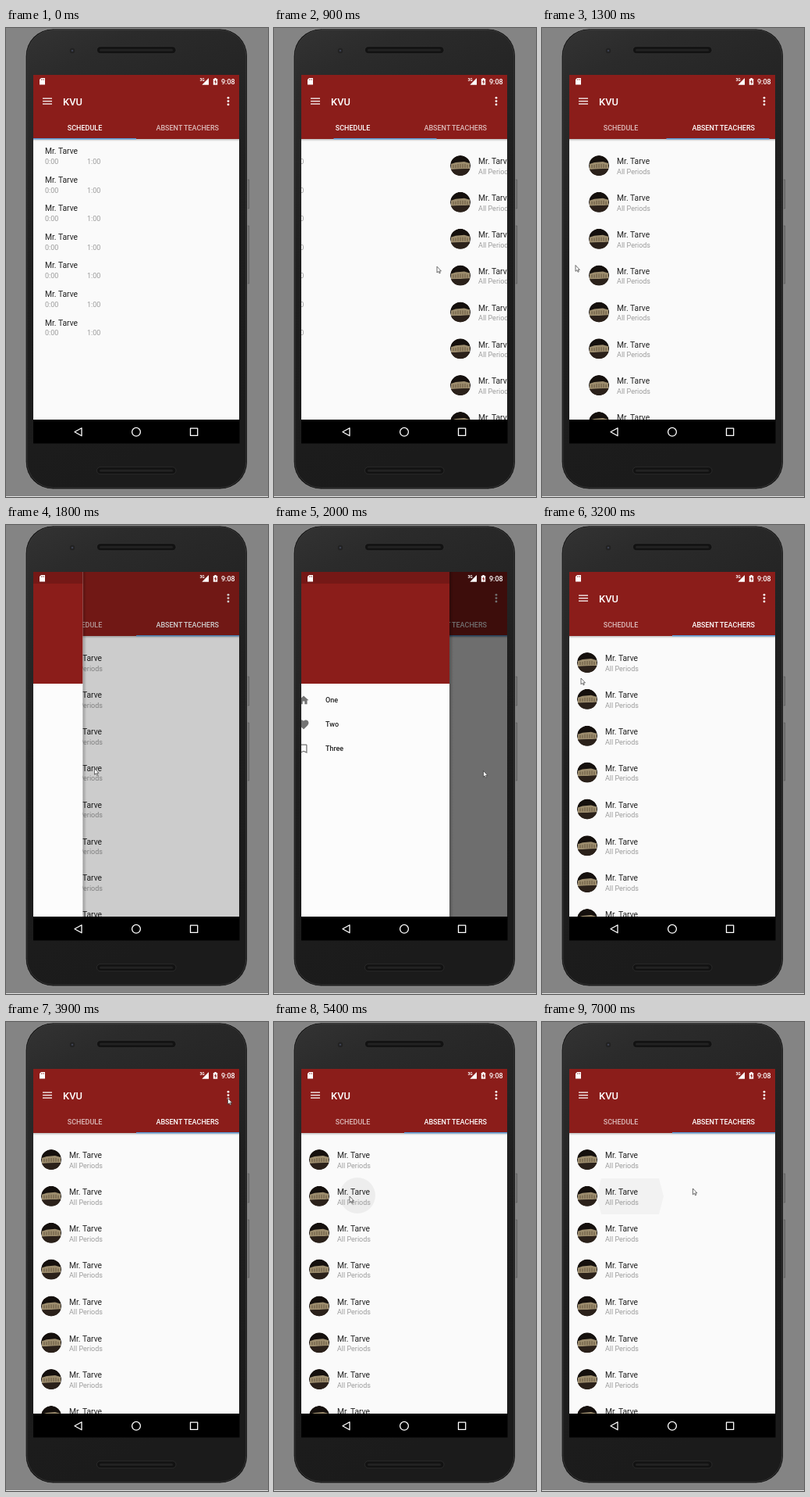
An HTML page that plays this animation: 336 px wide and 600 px high, repeating every 7.1 s.

```html
<!DOCTYPE html>
<html lang="en">
<head>
<meta charset="utf-8">
<style>
html, body { margin: 0; width: 100%; height: 100%; overflow: hidden; background: #848484; }
svg { display: block; width: 336px; height: 600px; font-family: Roboto, sans-serif; }
.name { font-size: 10.3px; fill: #212121; }
.sub { font-size: 9px; fill: #9c9c9c; }
.bold { font-size: 9px; font-weight: 500; }
.white { fill: #fff; }
</style>
</head>
<body>
<svg viewBox="0 0 336 600">
  <defs>
    <linearGradient id="body" x2=".25" y2="1">
      <stop stop-color="#333"/><stop offset=".12" stop-color="#2b2b2b"/>
      <stop offset=".5" stop-color="#1f1f1f"/><stop offset="1" stop-color="#1b1b1b"/>
    </linearGradient>
    <linearGradient id="down" x2="0" y2="1">
      <stop stop-opacity=".24"/><stop offset="1" stop-opacity="0"/>
    </linearGradient>
    <linearGradient id="right">
      <stop stop-opacity=".24"/><stop offset="1" stop-opacity="0"/>
    </linearGradient>
    <clipPath id="screen"><path d="M35 60h264v441H35z"/></clipPath>
    <clipPath id="disc"><circle r="13"/></clipPath>
    <g id="photo" clip-path="url(#disc)">
      <circle r="13" fill="#15100d"/>
      <path d="M-12-2L-6-4 5-5 12-3V4L-12 5z" fill="#9d8d6e"/>
      <path d="M-9-1V3M-6-1V3M-3-2V3M0-2V3M3-2V3M6-2V3M9-1V3" stroke="#5f4e38" stroke-width=".9"/>
      <path d="M-13 5L13 4V13H-13z" fill="#2b211a"/>
    </g>
    <g id="speaker">
      <rect x="116.5" width="101.5" height="9" rx="4.5" fill="#121212" stroke="#383838" stroke-width=".6"/>
      <rect x="120" y="3" width="94" height="3" rx="1.5" fill="#222"/>
    </g>
  </defs>

  <rect width="336" height="600" fill="#848484"/>
  <rect y="599" width="336" height="1" fill="#e4e4e4"/>
  <path d="M309 194h2.6v37H309zM309 253h2.6v74H309z" fill="#777" stroke="#4a4a4a" stroke-width=".5"/>
  <rect x="25.2" y="1" width="284.3" height="589" rx="35" fill="#101010" stroke="#a0a0a0" stroke-width=".6"/>
  <rect x="27" y="2.5" width="280.8" height="585.8" rx="33.5" fill="url(#body)" stroke="#444" stroke-width=".7"/>
  <circle cx="85" cy="29" r="3.2" fill="#222"/><circle cx="85" cy="29" r="1.3" fill="#3c4150"/>
  <use href="#speaker" y="23.7"/><use href="#speaker" y="561.7"/>

  <g clip-path="url(#screen)">
    <path d="M35 60h264v441H35z" fill="#fafafa"/>
    <g fill="#000">
      <circle id="spot" cx="107" cy="222" r="23" fill-opacity=".05"/>
      <path id="spread" d="M70 223L76 200H150L156 223 150 246H76z" fill-opacity=".03"/>
    </g>
    <g id="schedule"></g>
    <g id="teachers"></g>
    <path d="M35 142h264v3H35z" fill="url(#down)"/>
    <path d="M35 60h264v82H35z" fill="#8b1d1a"/>
    <path d="M47 90.2h12M47 93.7h12M47 97.2h12" stroke="#fff" stroke-width="1.2"/>
    <text x="73" y="98.5" class="white" font-size="12.9" font-weight="500">KVU</text>
    <g class="white"><circle cx="285" cy="89.3" r="1.4"/><circle cx="285" cy="93.6" r="1.4"/><circle cx="285" cy="97.9" r="1.4"/></g>
    <g class="bold white" text-anchor="middle">
      <text id="tab0" x="101" y="130.5">SCHEDULE</text>
      <text id="tab1" x="232.7" y="130.5">ABSENT TEACHERS</text>
    </g>
    <rect id="bar" x="35" y="141" width="132" height="1.5" fill="#5b9bd8"/>
    <rect id="scrim" x="35" y="60" width="264" height="441"/>

    <g id="drawer">
      <path d="M240 60h5v441h-5z" fill="url(#right)"/>
      <path d="M35 60h205v441H35z" fill="#fcfcfc"/>
      <path d="M35 60h205v143H35z" fill="#8b1d1a"/>
      <path d="M35 60h205v15H35z" fill-opacity=".16"/>
      <g id="items" fill="#737373"></g>
    </g>
  </g>

  <g class="white">
    <path d="M45 64h5v8.5h-7V66z"/>
    <path d="M45.5 65.2v1.6M47 65.2v1.6M48.5 65.2v1.6" stroke="#8b1d1a" stroke-width=".6"/>
    <text x="248.5" y="67.6" font-size="5" font-weight="700">3G</text>
    <path d="M260 64v8.7h-8.7z"/>
    <path d="M267.3 64h2.4v1h1.5v7.8h-5.4V65h1.5z"/>
    <path d="M269 66l-2 3.2h1.4V72l2-3.4H269z" fill="#8b1d1a"/>
    <text x="276" y="71.6" class="bold">9:08</text>
  </g>

  <path d="M35 501h264.5v30.5H35z"/>
  <g fill="none" stroke="#fff" stroke-width="1.3" stroke-linejoin="round">
    <path d="M97 511.8v10L88 516.8z"/><circle cx="167" cy="516.8" r="5.4"/><path d="M236.5 512.2h9.2v9.2h-9.2z"/>
  </g>
  <path id="cursor" d="M0 0V7.8L1.8 6.2 3.1 8.8 4.3 8.2 3.1 5.8H5.4z" fill="#fff" stroke="#333" stroke-width=".7"/>
</svg>
<script>
const $ = id => document.getElementById(id);
const text = (x, y, cls, s) => `<text x="${x}" y="${y}" class="${cls}">${s}</text>`;
const rows = (n, make) => Array.from({ length: n }, (_, i) => make(i)).join('');
const person = 'Mr. Tarve';

$('schedule').innerHTML = rows(7, i => {
  const y = 161.2 + 36.55 * i;
  return text(50, y, 'name', person) + text(50, y + 12.8, 'sub', '0:00') + text(104, y + 12.8, 'sub', '1:00');
});
$('teachers').innerHTML = rows(8, i => {
  const y = 174.3 + 46.85 * i;
  return `<use href="#photo" x="58" y="${y + 1.7}"/>` + text(81, y, 'name', person) + text(81, y + 12.6, 'sub', 'All Periods');
});

const icons = [
  'M10 20v-6h4v6h5v-8h3L12 3 2 12h3v8z',
  'M12 21.35l-1.45-1.32C5.4 15.36 2 12.28 2 8.5 2 5.42 4.42 3 7.5 3c1.74 0 3.41.81 4.5 2.09C13.09 3.81 14.76 3 16.5 3 19.58 3 22 5.42 22 8.5c0 3.78-3.4 6.86-8.55 11.54z',
  'M17 3H7c-1.1 0-2 .9-2 2v16l7-3 7 3V5c0-1.1-.9-2-2-2zm0 15l-5-2.18L7 18V5h10z'
];
$('items').innerHTML = ['One', 'Two', 'Three'].map((label, i) => {
  const y = 224.2 + 31 * i;
  return `<path d="${icons[i]}" fill-rule="evenodd" transform="translate(45.3 ${y - 7.7}) scale(.643)"/>` +
    `<g fill="#212121">${text(81, y + 3.2, 'bold', label)}</g>`;
}).join('');

// Each key is [time, ...values]
const page = [[700, 0], [1300, .943], [1400, 1]];
const slide = [[1700, 0], [2000, 190], [2100, 205], [2500, 205], [3000, 107], [3200, 0]];
const pointer = [[200, 312, 330], [700, 292, 306], [1300, 43, 303.5], [1600, 36, 308], [1700, 36, 310],
  [2000, 268.5, 314.5], [2400, 195, 203], [2500, 187, 197], [3000, 89, 195.5], [3200, 50, 196],
  [3900, 284.5, 97.5], [4200, 284.5, 97.5], [5000, 97, 223], [5700, 97, 223], [6200, 270, 400],
  [6400, 291, 452], [6600, 285, 440], [7000, 193.5, 213]];

function at(keys, t) {
  const i = keys.findIndex(k => k[0] > t);
  if (i === 0) return keys[0].slice(1);
  if (i < 0) return keys[keys.length - 1].slice(1);
  const a = keys[i - 1], b = keys[i], u = (t - a[0]) / (b[0] - a[0]);
  return a.slice(1).map((v, j) => v + (b[j + 1] - v) * u);
}
const move = (id, x, y = 0) => $(id).setAttribute('transform', `translate(${x} ${y})`);
const show = (id, on) => $(id).style.display = on ? '' : 'none';

function draw(now) {
  const t = Math.floor(now % 7100 / 100) * 100;
  const [p] = at(page, t), [open] = at(slide, t);
  move('schedule', -264 * p);
  move('teachers', 264 * (1 - p));
  move('bar', 132 * p);
  $('tab0').setAttribute('opacity', p < .5 ? 1 : .7);
  $('tab1').setAttribute('opacity', p < .5 ? .7 : 1);
  show('drawer', open > 0);
  move('drawer', open - 205);
  $('scrim').setAttribute('opacity', open / 205 * .6);
  show('spot', t >= 5000 && t < 5500);
  show('spread', t >= 5500);
  show('cursor', t >= 200);
  move('cursor', ...at(pointer, t));
  requestAnimationFrame(draw);
}
requestAnimationFrame(draw);
</script>
</body>
</html>
```
